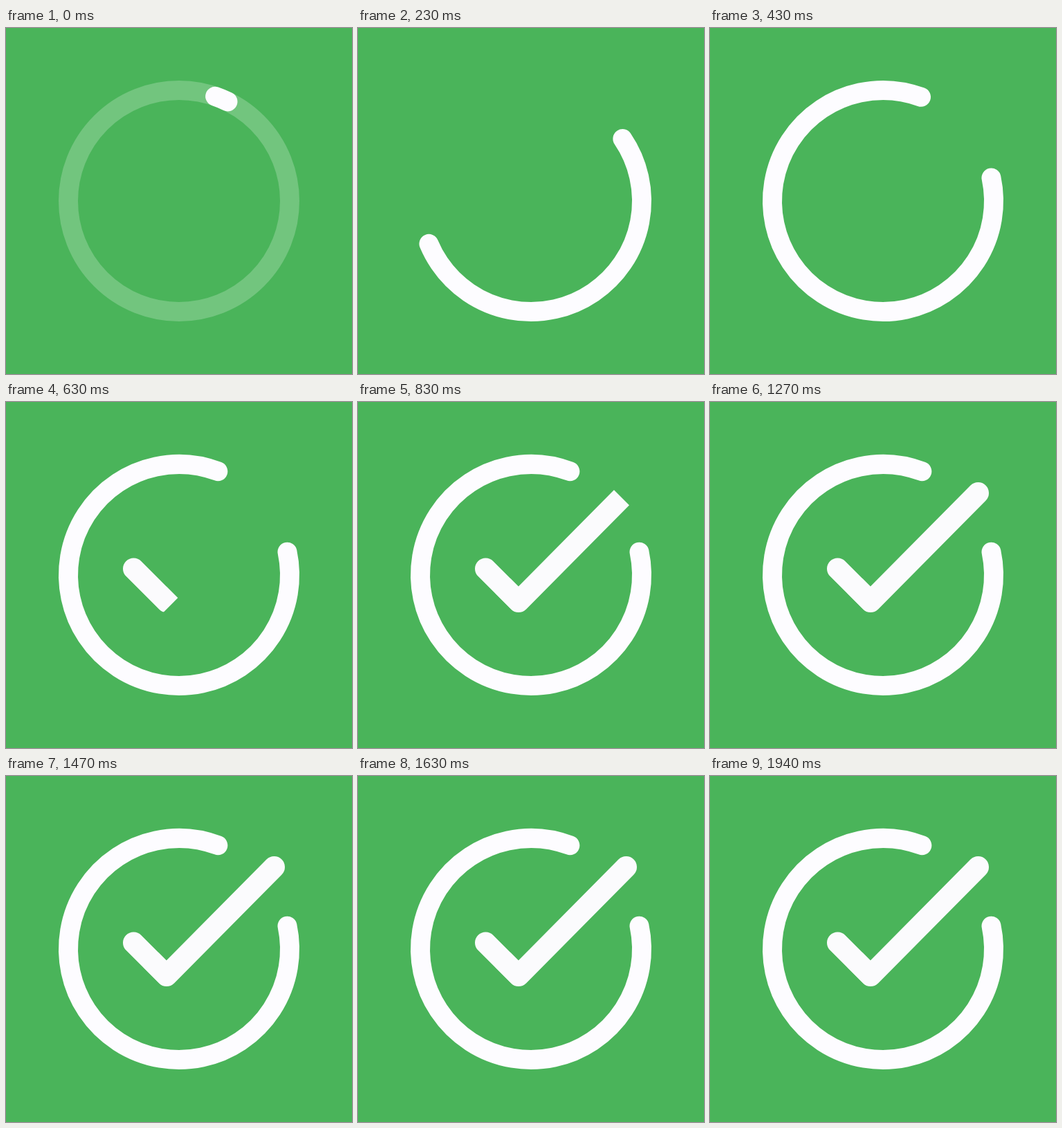
These frames come from a looping animation (500 px wide and 500 px high, 1980 ms). An HTML page:

```html
<!DOCTYPE html>
<html lang="en">
<head>
<meta charset="utf-8">
<title>Success check</title>
<style>
  html, body { margin: 0; width: 100%; height: 100%; overflow: hidden; background: #4ab45a; }
  svg { display: block; width: 100%; height: 100%; }
  path, circle { fill: none; stroke: #fdfcff; }
</style>
</head>
<body>
<svg viewBox="0 0 500 500">
  <mask id="reveal" maskUnits="userSpaceOnUse" x="0" y="0" width="500" height="500">
    <path id="short" d="M168.5 225 L243.5 300" stroke-width="31"/>
    <path id="long" d="M221 299.5 L405 115.5" stroke-width="64"/>
  </mask>
  <circle id="track" cx="250" cy="250" r="160" stroke-width="28"/>
  <circle id="ring" cx="250" cy="250" r="160" stroke-width="28" stroke-linecap="round" pathLength="360"/>
  <g mask="url(#reveal)">
    <path d="M184.5 241 L232 288.5 L387.5 131.5" stroke-width="31" stroke-linecap="round" stroke-linejoin="round"/>
  </g>
</svg>
<script>
const LOOP = 1980, SHORT = 106, LONG = 228, WIDTH = 31;
const [track, ring, short, long] = ['track', 'ring', 'short', 'long'].map(id => document.getElementById(id));

// Quadratic ease-in-out, from 0 to 1
function ease(t, start, duration) {
  const x = Math.min(1, Math.max(0, (t - start) / duration));
  return x < .5 ? 2 * x * x : 1 - 2 * (1 - x) ** 2;
}

function dash(el, length) {
  el.style.visibility = length > 0 ? 'visible' : 'hidden';
  el.setAttribute('stroke-dasharray', `${length} 999`);
}

function draw(t) {
  const turn = ease(t, -53, 497);
  ring.setAttribute('transform', `rotate(${60.4 * turn - 72.4} 250 250)`);
  dash(ring, 302.6 * turn);
  track.setAttribute('stroke-opacity', .22 * Math.max(0, 1 - t / 130));

  // The long arm starts under the corner that the short arm has already uncovered
  const front = (SHORT + LONG) * ease(t, 440, 500);
  dash(short, Math.min(front, SHORT));
  dash(long, front > SHORT ? front - SHORT + WIDTH : 0);
}

const begin = performance.now();
function tick() {
  draw((performance.now() - begin) % LOOP);
  requestAnimationFrame(tick);
}
tick();
</script>
</body>
</html>
```
